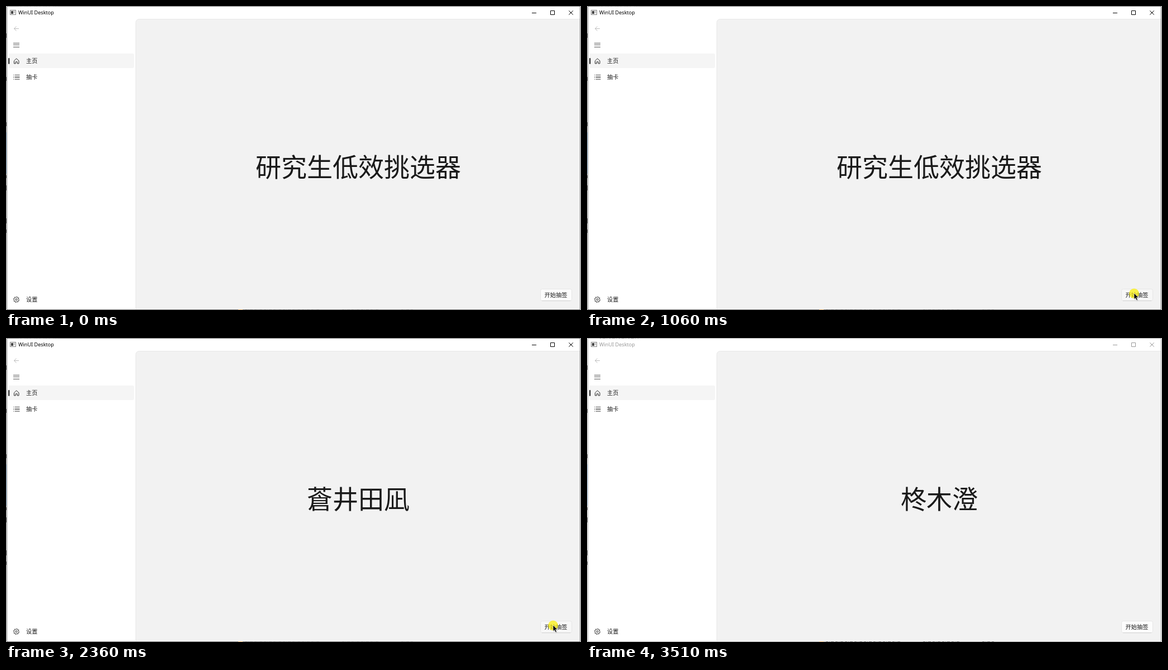
Write an HTML page that moves like this. It is 1030 px wide and 544 px high and loops after 3580 ms.

```html
<!DOCTYPE html>
<html lang="zh-CN">
<head>
<meta charset="utf-8">
<title>WinUI Desktop</title>
<style>
  html, body { margin: 0; width: 100%; height: 100%; overflow: hidden; background: #fff; }
  svg { display: block; width: 1030px; height: 544px; }
  text { font: 10.2px "Noto Sans CJK SC", "Noto Sans CJK", sans-serif; fill: #1a1a1a; }
  .line { fill: none; stroke: #2b2b2b; stroke-width: 1; }
  #caption { font: 9.1px "Noto Sans", sans-serif; }
  #headline { font-size: 46px; text-anchor: middle; }
  #frame { --edge: #696969; --ink: #000; }
  #frame.idle { --edge: #a3a3a3; --ink: #999; }
  #edge { fill: #fff; stroke: var(--edge); }
  #caption { fill: var(--ink); }
  #controls { stroke: var(--ink); }
</style>
</head>
<body>
<svg viewBox="0 0 1030 544">
  <!-- slivers of the desktop around the window -->
  <rect width="1030" height="544" fill="#e9e9e9"/>
  <rect y="226" width="1" height="74" fill="#b9d4ee"/>
  <path d="M.5 49v8M.5 127v7M.5 208v7M.5 303v5M.5 321v9M.5 380v9M.5 400v6" stroke="#777"/>

  <g id="frame">
    <rect id="edge" x="1.5" y=".5" width="1027" height="543"/>
    <path d="M23 .5h69" stroke="#777" stroke-dasharray="2 3 5 2 1 4"/>
    <path d="M428 543.5h134M602 543.5h67M708 543.5h21" stroke="#555" stroke-dasharray="4 2 1 2 5 3"/>
    <path d="M416 543.5h8" stroke="#d8a765"/>

    <!-- title bar -->
    <rect x="7.5" y="7.5" width="10" height="8" fill="#f4f4f4" stroke="#8a8a8a"/>
    <rect x="9" y="9" width="4" height="5" fill="#444"/>
    <path d="M14 9.5h2M14 11.5h2" stroke="#999"/>
    <text id="caption" x="22" y="15.3">WinUI Desktop</text>
    <path id="controls" class="line" d="M942 12.5h8M975.5 8.5h7v7h-7zM1008.3 8.3l7.4 7.4M1015.7 8.3l-7.4 7.4"/>
  </g>

  <!-- navigation -->
  <path class="line" d="M23 40.5h-8.5m4-4l-4 4l4 4" style="stroke:#bdbdbd"/>
  <path class="line" d="M13 66.5h11M13 69.5h11M13 73.5h11" style="stroke:#555"/>
  <rect x="4" y="85" width="225.5" height="26" rx="3" fill="#f5f5f5"/>
  <rect x="4" y="93" width="2.4" height="11" rx="1.2" fill="#333"/>
  <path class="line" d="M14.5 98l4.2-4l4.3 4v5h-2.8v-3.2h-2.9v3.2h-2.8z"/>
  <path class="line" d="M15.5 123.5h9M15.5 126.5h9M15.5 128.5h9M15.5 131.5h9M13 123.5h1M13 126.5h1M13 128.5h1M13 131.5h1" style="stroke:#555"/>
  <text x="36" y="102.4">主页</text>
  <text x="36" y="131.4">抽卡</text>
  <path id="gear" class="line" stroke-linejoin="round"/>
  <circle class="line" cx="18.5" cy="525.3" r="1.6"/>
  <text x="36" y="529.4">设置</text>

  <!-- page -->
  <path d="M232.5 542.5V29.5a6 6 0 0 1 6-6H1028V542.5z" fill="#f2f2f2"/>
  <path d="M232.5 542.5V29.5a6 6 0 0 1 6-6H1028" fill="none" stroke="#e8e8e8"/>
  <text id="headline" x="631" y="305"></text>
  <rect id="button" x="957.5" y="506.5" width="56" height="21" rx="3" stroke="#e6e6e6"/>
  <path id="lip" d="M960 527.5h51" stroke="#cfcfcf"/>
  <text id="label" x="964.6" y="520.7">开始抽签</text>

  <circle id="halo" cx="980" cy="514.5" r="9" fill="#faee00" fill-opacity=".7"/>
  <g id="cursor">
    <path d="M1 1.5v11l2.5-2.2 1.8 3.8 2.2-1-1.8-3.6H9z" fill="#000" opacity=".15"/>
    <path d="M0 0v10.6l2.4-2.2 1.9 4.1 2-.9-1.9-4H7.7z" fill="#000" stroke="#fff" stroke-width=".6"/>
  </g>
</svg>
<script>
const LOOP = 3580;
const TITLE = '研究生低效挑选器';

// mouse down, button pressed, mouse up, drawn name
const CLICKS = [
  [1060, 1130, 1160, '雪野原澪'],
  [1520, 1590, 1620, '霧瀬穂乃'],
  [1920, 1950, 2060, '蒼井田凪'],
  [2360, 2390, 2510, '篠森結'],
  [2760, 2790, 2890, '柊木澄']
];

// time, x, y of the pointer tip
const PATH = [
  [120, 992, 546], [180, 989, 520], [250, 985, 455], [320, 982, 395],
  [390, 980, 357], [430, 979, 350], [460, 979, 353.5], [520, 979, 386],
  [580, 979, 438], [640, 979, 481], [670, 979, 489], [760, 980, 507],
  [880, 980, 514], [2890, 980, 514], [2950, 980, 521], [3050, 983, 546]
];

const $ = id => document.getElementById(id);
const [frame, headline, button, lip, label, halo, cursor] =
  ['frame', 'headline', 'button', 'lip', 'label', 'halo', 'cursor'].map($);

function gearPath(cx, cy) {
  const points = [];
  for (let i = 0; i < 32; i++) {
    const a = (i + .5) * Math.PI / 16;
    const r = i % 4 < 2 ? 5.1 : 3.9;
    points.push((cx + r * Math.cos(a)).toFixed(2) + ' ' + (cy + r * Math.sin(a)).toFixed(2));
  }
  return 'M' + points.join('L') + 'z';
}

// The pointer is sampled every 30 ms, as in a screen recording.
function pointer(time) {
  const t = Math.max(PATH[0][0], Math.floor((time - 10) / 30) * 30 + 10);
  const i = PATH.findIndex(p => p[0] > t);
  if (i < 1) return PATH[PATH.length - 1].slice(1);
  const [a, b] = [PATH[i - 1], PATH[i]];
  const k = (t - a[0]) / (b[0] - a[0]);
  return [1, 2].map(n => a[n] + (b[n] - a[n]) * k);
}

function render(t) {
  const drawn = CLICKS.filter(c => t >= c[2]).pop();
  const click = CLICKS.find(c => t >= c[0] && t < c[2]);
  const pressed = click && t >= click[1];
  const [x, y] = pointer(t);
  const visible = t >= 120 && t < 3050;
  const hover = visible && y > 506 && y < 528 && t > 640;

  frame.setAttribute('class', t >= 120 && t < 1060 || t >= 3510 ? 'idle' : '');
  const name = drawn ? drawn[3] : TITLE;
  if (headline.textContent !== name) headline.textContent = name;
  button.style.fill = pressed ? '#f4f4f4' : hover ? '#f7f7f7' : '#fcfcfc';
  lip.style.opacity = pressed ? 0 : 1;
  label.style.fill = pressed ? '#666' : '#1a1a1a';
  halo.style.display = click ? '' : 'none';
  cursor.style.display = visible ? '' : 'none';
  cursor.setAttribute('transform', `translate(${x} ${y})`);
}

$('gear').setAttribute('d', gearPath(18.5, 525.3));
const start = performance.now();
function tick() {
  render((performance.now() - start) % LOOP);
  requestAnimationFrame(tick);
}
tick();
</script>
</body>
</html>
```
